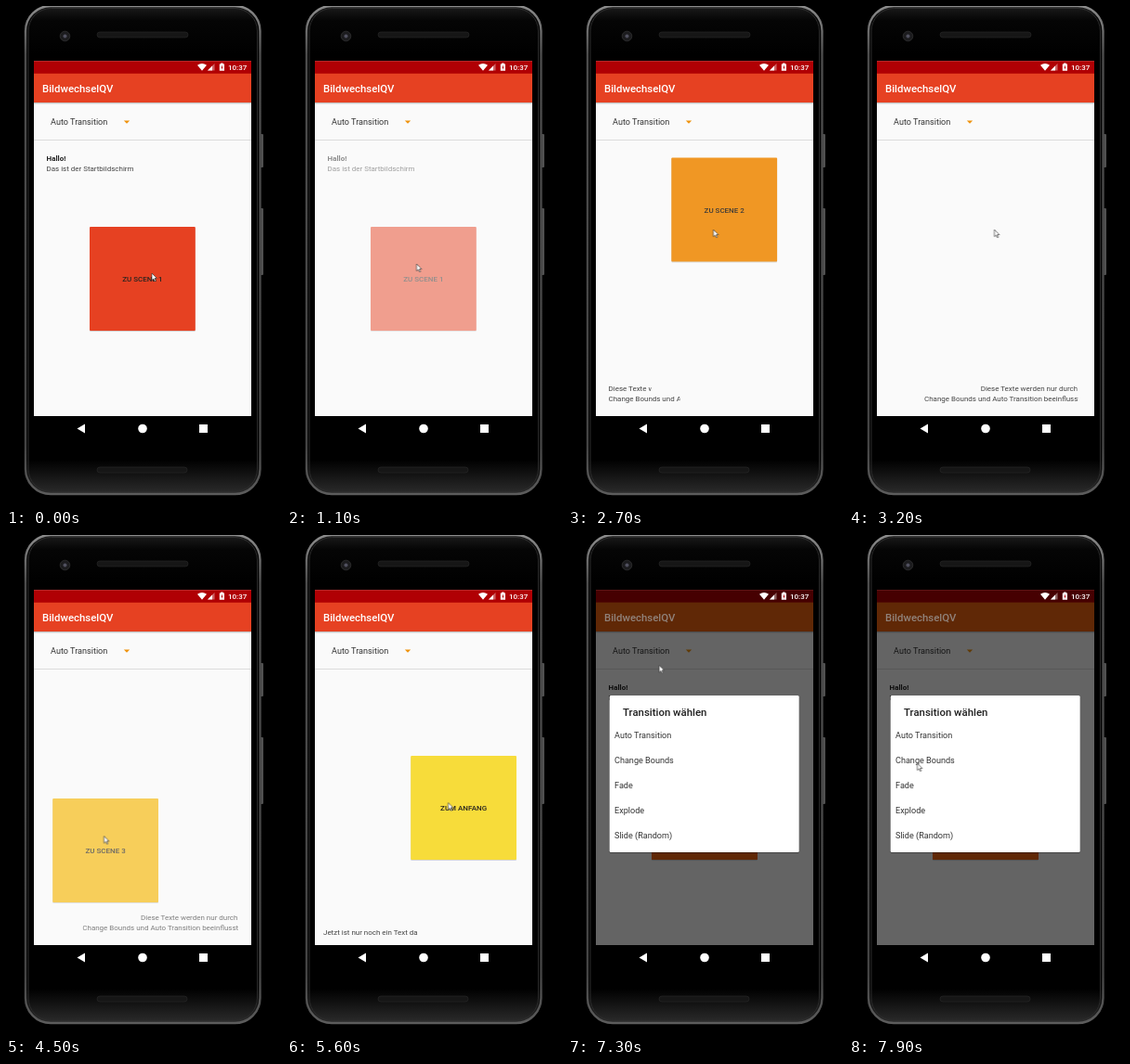
These frames come from a looping animation (296x540 px, 8000 ms). An HTML page:

```html
<!DOCTYPE html>
<html lang="de">
<head>
<meta charset="utf-8">
<title>Szenenwechsel</title>
<style>
  html, body { margin: 0; width: 100%; height: 100%; overflow: hidden; background: #000; }
  svg { display: block; width: 296px; height: 540px; }
  text { font-family: Roboto, sans-serif; font-size: 7.97px; fill: #444; white-space: pre; }
  .medium { font-weight: 500; }
  .label { font-weight: 500; fill: #282420; text-anchor: middle; }
  .item { font-size: 9.1px; fill: #333; }
  .title { font-size: 11.4px; font-weight: 500; }
  #dialog { transform-origin: 147px 257px; }
</style>
</head>
<body>
<svg viewBox="0 0 296 540">
  <defs>
    <linearGradient id="rim" x1="0" x2="0" y1="0" y2="1">
      <stop offset="0" stop-color="#8c8c8c"/>
      <stop offset=".1" stop-color="#4c4c4c"/>
      <stop offset=".9" stop-color="#444"/>
      <stop offset="1" stop-color="#5c5c5c"/>
    </linearGradient>
    <linearGradient id="face" x1="0" x2="0" y1="0" y2="1">
      <stop offset="0" stop-color="#1c1c1c"/>
      <stop offset=".03" stop-color="#050505"/>
      <stop offset=".1" stop-color="#000"/>
      <stop offset=".93" stop-color="#000"/>
      <stop offset="1" stop-color="#2c2c2c"/>
    </linearGradient>
  </defs>
  <rect width="296" height="540"/>

  <!-- phone body -->
  <rect x="273" y="138" width="4" height="36" rx="1" fill="#505050"/>
  <rect x="273" y="218" width="4" height="72" rx="1" fill="#505050"/>
  <rect x="21" y="0" width="252.5" height="526" rx="27" fill="url(#face)" stroke="url(#rim)" stroke-width="2.4"/>
  <rect x="24" y="2.5" width="246.5" height="521" rx="24.5" fill="none" stroke="#2c2c2c"/>
  <rect x="98" y="28" width="98" height="6" rx="3" fill="#161616" stroke="#2a2a2a" stroke-width=".6"/>
  <rect x="98" y="497" width="97" height="6" rx="3" fill="#161616" stroke="#2a2a2a" stroke-width=".6"/>
  <circle cx="63.5" cy="32.5" r="5.3" fill="#1c1c1e" stroke="#333" stroke-width=".8"/>
  <circle cx="63.5" cy="32.5" r="2" fill="#50505e"/>

  <!-- screen -->
  <rect x="30" y="59.2" width="234" height="382.8" fill="#fafafa"/>
  <rect x="30" y="104" width="234" height="1" fill="#c4c4c4"/>
  <rect x="30" y="105" width="234" height="1" fill="#e8e8e8"/>
  <rect x="30" y="59.2" width="234" height="14" fill="#b00004"/>
  <rect x="30" y="72.8" width="234" height="31.2" fill="#e64122"/>
  <rect x="30" y="144" width="234" height="1" fill="#dcdcdc"/>
  <text class="item" x="48" y="128">Auto Transition</text>
  <path d="M126.8 123.4h6.4l-3.2 3.3z" fill="#ef9410"/>

  <g id="start">
    <text x="43.5" y="167" font-weight="700" style="fill:#222">Hallo!</text>
    <text x="43.5" y="178">Das ist der Startbildschirm</text>
    <g class="button" data-x="90" data-y="238" data-fill="#e64122" data-label="ZU SCENE 1"></g>
  </g>
  <g id="orange">
    <g class="button" data-x="111.3" data-y="163.6" data-fill="#ef8b09" data-label="ZU SCENE 2"></g>
  </g>
  <g id="cross">
    <text x="43.5" y="415">Jetzt geht es</text>
    <text x="43.5" y="426">kreuz und quer weiter</text>
  </g>
  <g id="notes">
    <text id="note1" y="415">Diese Texte werden nur durch</text>
    <text id="note2" y="426">Change Bounds und Auto Transition beeinflusst</text>
  </g>
  <g id="amber">
    <g class="button" data-x="50.2" data-y="284" data-fill="#f6b90e" data-label="ZU SCENE 3"></g>
  </g>
  <g id="yellow">
    <text x="39" y="431">Jetzt ist nur noch ein Text da</text>
    <g class="button" data-x="133.2" data-y="238" data-fill="#f7dc3a" data-label="ZUM ANFANG"></g>
  </g>

  <!-- navigation -->
  <path d="M76.5 455.5l8.5-5v10z" fill="#fff"/>
  <circle cx="147" cy="455.5" r="4.8" fill="#fff"/>
  <rect x="208" y="451" width="9" height="9" fill="#fff"/>

  <g id="dim">
    <rect x="30" y="59.2" width="234" height="382.8" opacity=".6"/>
    <path d="M30 72.8h234v31.2h-234zM90 238h113.8v112h-113.8z" fill="#602806"/>
  </g>
  <text id="appName" class="title" x="39" y="92.7">BildwechselQV</text>

  <!-- status icons -->
  <path d="M206 63.8q5-3.6 10 0l-5 6z" fill="#fff"/>
  <path d="M217 69.5l7.5-7.5v7.5z" fill="#fff" opacity=".4"/>
  <path d="M217 69.5l5-5v5z" fill="#fff"/>
  <path d="M229.8 62.5h1.4v-1h2.4v1h1.4v7.3h-5.2z" fill="#fff"/>
  <path d="M232.8 63.5l-1.5 3h1l-.3 2.3 1.7-3.1h-1.1z" fill="#b00004"/>
  <text class="medium" x="239" y="69" style="fill:#fff">10:37</text>

  <g id="dialog">
    <rect x="44.7" y="174" width="204" height="169" rx="1.5" opacity=".35"/>
    <rect x="44.7" y="173" width="204" height="169" rx="1.5" fill="#fff"/>
    <text class="title" x="59" y="194.6" style="fill:#222">Transition wählen</text>
  </g>

  <path id="cursor" d="M0 0v7.6l1.8-1.6 1.3 2.7 1.2-.5-1.3-2.7h2.4z" fill="#fff" stroke="#333" stroke-width=".65"/>
</svg>
<script>
const LOOP = 8000;
const SINE = 'cubic-bezier(.37,0,.63,1)';
const $ = id => document.getElementById(id);

function add(parent, tag, attrs, content = '') {
  const el = document.createElementNS('http://www.w3.org/2000/svg', tag);
  for (const key in attrs) el.setAttribute(key, attrs[key]);
  el.textContent = content;
  parent.append(el);
}

for (const g of document.querySelectorAll('.button')) {
  const { fill, label } = g.dataset, x = +g.dataset.x, y = +g.dataset.y;
  const box = { x, width: 113.8, height: 112, rx: 1 };
  add(g, 'rect', { ...box, y: y + 1, opacity: .15 });
  add(g, 'rect', { ...box, y, fill });
  add(g, 'text', { class: 'label', x: x + 56.9, y: y + 59 }, label);
}

['Auto Transition', 'Change Bounds', 'Fade', 'Explode', 'Slide (Random)'].forEach((name, i) =>
  add($('dialog'), 'text', { class: 'item', x: 50, y: 219.2 + 27 * i }, name));

// Each step: [time in ms, properties, easing towards the next step]
function play(id, steps) {
  const all = [[0, steps[0][1]], ...steps, [LOOP, steps.at(-1)[1]]];
  $(id).animate(
    all.map(([ms, props, easing = 'linear']) => ({ offset: ms / LOOP, easing, ...props })),
    { duration: LOOP, iterations: Infinity });
}

const show = (ms, span = 300) => [[ms, { opacity: 0 }, SINE], [ms + span, { opacity: 1 }]];
const hide = (ms, span = 300) => [[ms, { opacity: 1 }, SINE], [ms + span, { opacity: 0 }]];

play('start', [...hide(950), ...show(5900)]);
play('orange', [...show(1250), ...hide(2636)]);
play('cross', [...show(1250), ...hide(2636, 1)]);
play('notes', [...show(2636, 1), ...hide(4385)]);
play('amber', [...show(3236), ...hide(4385)]);
play('yellow', [...show(4685), ...hide(5600)]);

const bounds = (x, width) => ({
  transform: `translate(${x}px, 0px)`,
  clipPath: `polygon(0px -2px, ${width}px -2px, ${width}px 14px, 0px 14px)`
});
play('note1', [[2936, bounds(43.5, 46), SINE], [3236, bounds(145, 106)]]);
play('note2', [[2936, bounds(43.5, 77), SINE], [3236, bounds(82.3, 168.5)]]);

play('dim', show(6950, 220));
play('appName', [[6950, { fill: '#fff' }], [7170, { fill: '#90827a' }]]);
play('dialog', [
  [6950, { opacity: 0, transform: 'scale(.9)' }, 'ease-out'],
  [7170, { opacity: 1, transform: 'scale(1)' }]
]);

const path = [
  [50, 157, 288], [700, 139.5, 278],
  [1850, 139.5, 278], [2200, 156.5, 241],
  [3300, 156.5, 241], [4000, 105.5, 324.5],
  [5050, 105.5, 324.5], [5500, 173.5, 288.5],
  [5700, 173.5, 288.5], [5900, 158, 248],
  [6200, 97.5, 145], [6400, 100, 133],
  [7200, 100, 133], [7800, 72.5, 243], [7900, 73.5, 246]
];
play('cursor', path.map(([ms, x, y]) =>
  [ms, { transform: `translate(${x}px, ${y}px)` }, ms === 5900 ? 'linear' : SINE]));
</script>
</body>
</html>
```
